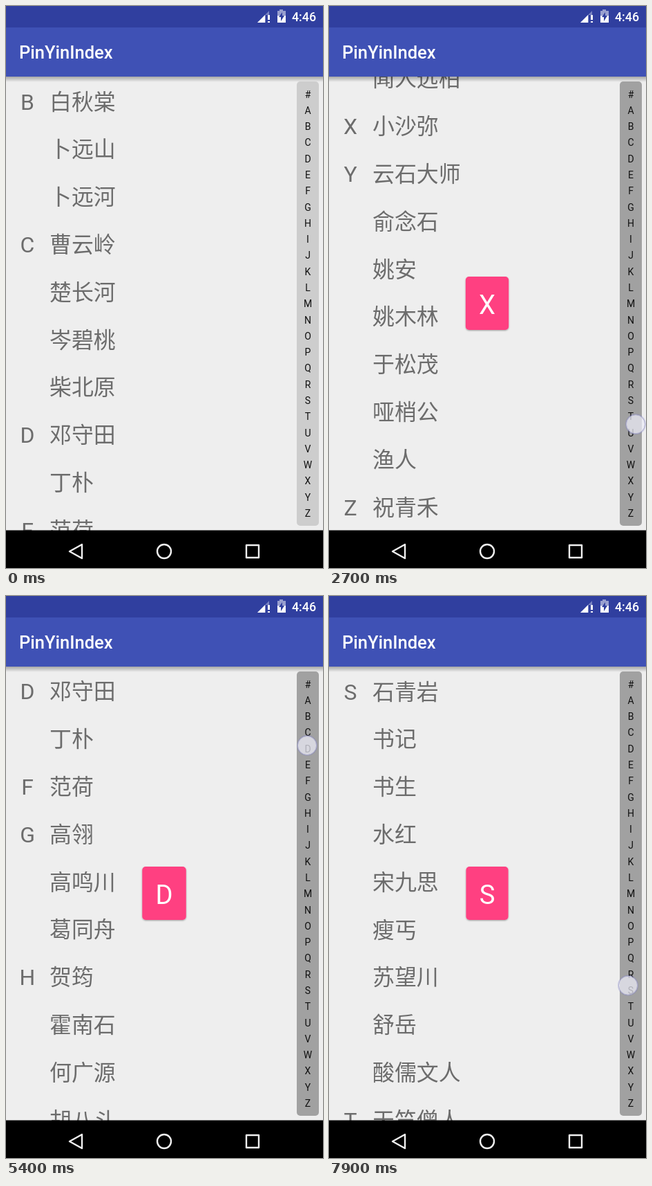
Animation, 459 px wide and 812 px high, one loop 8 s. Source, as an HTML page:

```html
<!DOCTYPE html>
<html lang="zh-CN">
<head>
<meta charset="utf-8">
<style>
  html, body { margin: 0; height: 100%; overflow: hidden; background: #eee; }
  svg { display: block; width: 459px; height: 812px; font-family: Roboto, "Noto Sans CJK SC", "Noto Sans CJK", sans-serif; }
  .mid { text-anchor: middle; }
  #list { font-size: 31.9px; fill: #6c6c6c; }
  #index { font-size: 14px; fill: #111; }
  #nav { fill: none; stroke: #f0f0f0; stroke-width: 2.4; stroke-linejoin: round; }
</style>
</head>
<body>
<svg viewBox="0 0 459 812">
  <defs>
    <linearGradient id="fade" x2="0" y2="1">
      <stop offset="0" stop-opacity=".3"/>
      <stop offset="1" stop-opacity="0"/>
    </linearGradient>
    <filter id="shadow" x="-20%" y="-20%" width="140%" height="140%">
      <feDropShadow dx="0" dy="1" stdDeviation="1.2" flood-opacity=".35"/>
    </filter>
  </defs>
  <rect width="459" height="812" fill="#eee"/>
  <g id="list"></g>
  <rect y="102" width="459" height="8" fill="url(#fade)"/>
  <rect id="bar" x="421" y="109" width="32" height="642" rx="5"/>
  <g id="index" class="mid"></g>
  <g id="popup">
    <rect id="card" y="391" height="77" rx="5" fill="#ff4081" filter="url(#shadow)"/>
    <text id="big" class="mid" x="229" y="444.5" font-size="38.2" fill="#fff"></text>
  </g>

  <rect width="459" height="102" fill="#3f51b5"/>
  <rect width="459" height="31" fill="#303f9f"/>
  <text x="19" y="76" font-size="25.5" font-weight="500" fill="#fff">PinYinIndex</text>
  <g fill="#fff">
    <path d="M364 24L381 7V13H376V24Z" opacity=".35"/>
    <path d="M364 24L375 13V24Z"/>
    <path d="M379 13h3v7h-3zM379 22h3v2h-3z"/>
    <path d="M396 5h5v2h4v7h-12V7h3z" opacity=".5"/>
    <path d="M393 14h12v10h-12z"/>
    <path d="M400 9L395 16H398V22L403 14H400Z" fill="#303f9f"/>
    <text x="414" y="21.5" font-size="17.8" font-weight="500">4:46</text>
  </g>

  <rect y="757.5" width="459" height="55"/>
  <g id="nav">
    <path d="M92 788L110 778V798Z"/>
    <circle cx="229" cy="788" r="10"/>
    <rect x="348" y="779" width="18" height="18"/>
  </g>
  <g id="finger">
    <circle r="15" fill="#7d7dc8" opacity=".3"/>
    <circle r="13.5" fill="#fff" fill-opacity=".62" stroke="#b0b0d0"/>
  </g>
</svg>
<script>
const $ = id => document.getElementById(id);
const LOOP = 8000, STEP = 100, ROW = 68.8, TOP = 102, VIEW = 655;
const PITCH = 23.29, FIRST = 127.5;
const LETTERS = '#ABCDEFGHIJKLMNOPQRSTUVWXYZ';

const SECTIONS = {
  B: '白秋棠 卜远山 卜远河',
  C: '曹云岭 楚长河 岑碧桃 柴北原',
  D: '邓守田 丁朴',
  F: '范荷',
  G: '高翎 高鸣川 葛同舟',
  H: '贺筠 霍南石 何广源 胡八斗 侯青林 韩小舟 黄柳 黄砚田 花匠 和尚',
  J: '季长松 焦石',
  K: '孔铁牛',
  L: '路野 李桃 梁石翁 黎木 老道人',
  M: '马青峰 孟秋帆',
  N: '南渡客',
  O: '欧云帆 欧云舟',
  P: '潘石林',
  Q: '秦松年 邱远 樵夫',
  S: '石青岩 书记 书生 水红 宋九思 瘦丐 苏望川 舒岳 酸儒文人',
  T: '天竺僧人 谭远',
  W: '王砚耕 吴青麦 魏河 闻人远柏',
  X: '小沙弥',
  Y: '云石大师 俞念石 姚安 姚木林 于松茂 哑梢公 渔人',
  Z: '祝青禾'
};

// Each drag or tap: its x and the [time, y] turning points; the finger lifts at the last.
const GESTURES = [
  { x: 444, path: [[800, 213], [2500, 724], [2600, 680], [3300, 150], [3700, 269], [4300, 527]] },
  { x: 437, path: [[4600, 314], [4900, 318]] },
  { x: 436, path: [[5400, 216], [5600, 218]] },
  { x: 439, path: [[6100, 196], [6800, 154]] },
  { x: 433, path: [[7100, 200], [7700, 592], [8000, 548]] }
];

function addText(parent, x, y, str, cls = '') {
  const el = document.createElementNS('http://www.w3.org/2000/svg', 'text');
  el.setAttribute('x', x);
  el.setAttribute('y', y);
  el.setAttribute('class', cls);
  el.textContent = str;
  parent.append(el);
}

const start = {};
let rows = 0;
for (const [letter, names] of Object.entries(SECTIONS)) {
  start[letter] = rows;
  names.split(' ').forEach((name, i) => {
    const y = TOP + rows++ * ROW + 47.5;
    if (!i) addText($('list'), 31, y, letter, 'mid');
    addText($('list'), 63, y, name);
  });
}
[...LETTERS].forEach((c, i) => addText($('index'), 437, FIRST + i * PITCH + 5, c));

function yAt(path, t) {
  const i = path.findIndex(p => p[0] > t);
  const [t0, y0] = path[i - 1], [t1, y1] = path[i];
  return y0 + (y1 - y0) * (t - t0) / (t1 - t0);
}

const letterAt = y => LETTERS[Math.round((y - FIRST) / PITCH)];

// Scroll only as far as needed to show the section's first row in full.
function reveal(scroll, letter) {
  if (!(letter in start)) return scroll;
  const top = start[letter] * ROW;
  return Math.max(top + ROW - VIEW, Math.min(scroll, top));
}

const states = [];
let scroll = 0;
for (let t = 0; t < LOOP; t += STEP) {
  const state = {};
  const g = GESTURES.find(({ path }) => t >= path[0][0] && t < path.at(-1)[0]);
  if (g) {
    state.touch = [g.x, yAt(g.path, t)];
    // The list answers one step after the finger.
    state.letter = letterAt(yAt(g.path, Math.max(g.path[0][0], t - STEP)));
    scroll = reveal(scroll, state.letter);
  }
  state.scroll = scroll;
  states.push(state);
}

function draw(now) {
  const { touch, letter, scroll } = states[Math.floor(now % LOOP / STEP)];
  $('list').setAttribute('transform', `translate(0 ${-scroll})`);
  $('bar').setAttribute('fill', touch ? '#a1a1a1' : '#cdcdcd');
  for (const id of ['popup', 'finger']) $(id).style.display = touch ? '' : 'none';
  if (touch) {
    $('finger').setAttribute('transform', `translate(${touch})`);
    $('big').textContent = letter;
    const w = $('big').getComputedTextLength() + 38.4;
    $('card').setAttribute('x', 229 - w / 2);
    $('card').setAttribute('width', w);
  }
}

const t0 = performance.now();
(function tick() {
  draw(performance.now() - t0);
  requestAnimationFrame(tick);
})();
</script>
</body>
</html>
```
